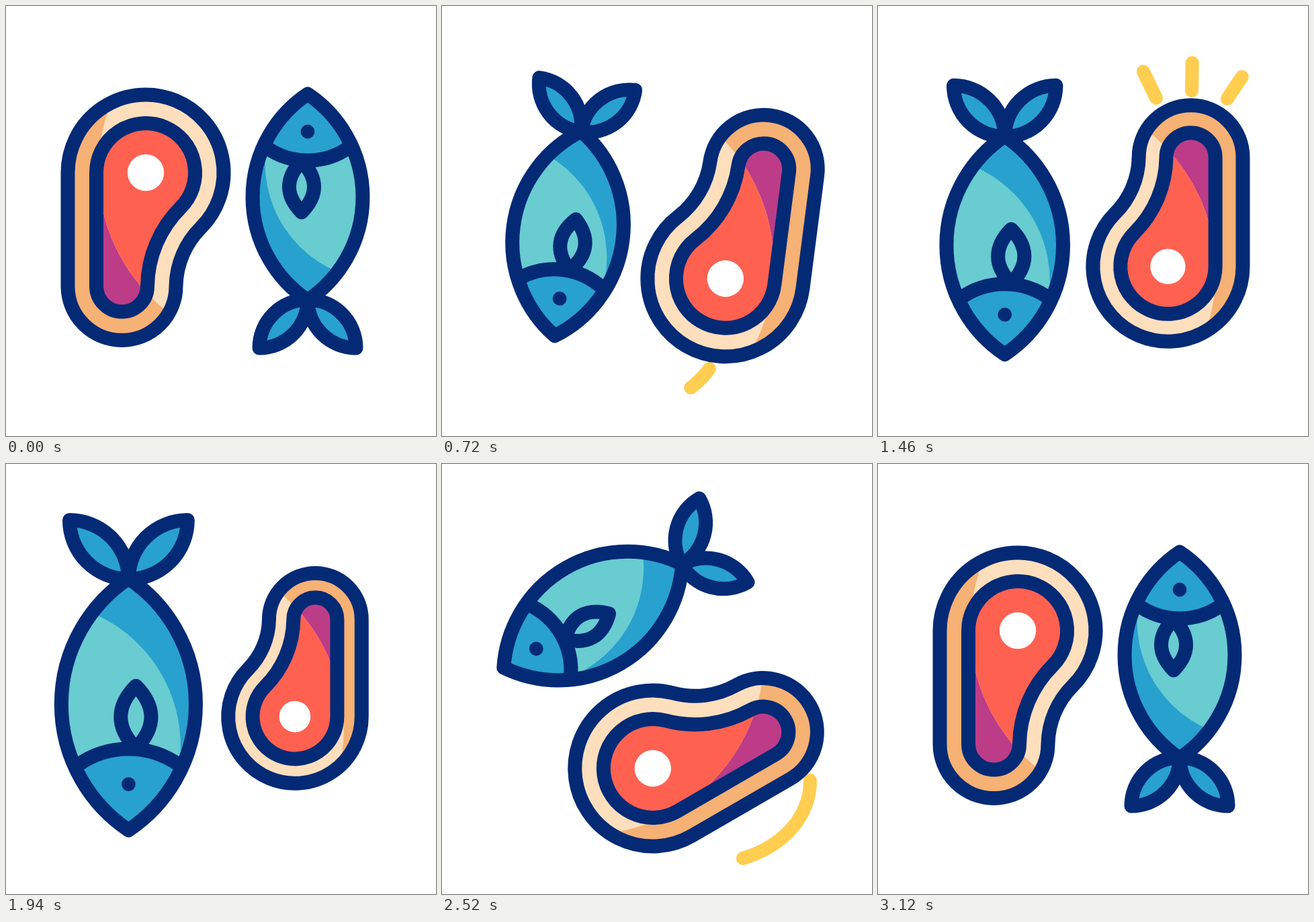
An HTML page with a canvas for the animation above (3.24 s loop, 640 px wide and 640 px high).

```html
<!DOCTYPE html>
<html lang="en">
<head>
<meta charset="utf-8">
<title>Steak and fish</title>
<style>
  html, body { margin: 0; width: 100%; height: 100%; overflow: hidden; background: #fff; }
  canvas { display: block; width: 100vmin; height: 100vmin; margin: 0 auto; }
</style>
</head>
<body>
<canvas id="stage" width="640" height="640"></canvas>
<script>
const ctx = document.getElementById('stage').getContext('2d');
const LOOP = 3240, LINE = 21;
const NAVY = '#042a76', YELLOW = '#ffcd50', BLUE = '#28a1ce', TEAL = '#68ccd1',
      FAT = '#fddfbd', FAT_DARK = '#f6b174', MEAT = '#ff6151', MEAT_DARK = '#bc3c87';

// Shapes in their resting pose
const rind = new Path2D('M92 248A116 116 0 1 1 290 330A126 126 0 0 0 253 417A80.5 80.5 0 0 1 92 417Z');
const meat = new Path2D('M134.5 248A73.5 73.5 0 1 1 260 300A168 168 0 0 0 210.5 417A38 38 0 0 1 134.5 417Z');
const body = new Path2D('M449 131A184.7 184.7 0 0 0 449 438A184.7 184.7 0 0 0 449 131Z');
const gill = new Path2D('M386 209.5A107 107 0 0 0 512 209.5');
const fin = new Path2D('M440 231C415.3 256 415.3 282 440 307C464.7 282 464.7 256 440 231Z');
const tails = [
  new Path2D('M449 437A72 72 0 0 0 377 509A72 72 0 0 0 449 437Z'),
  new Path2D('M449 437A72 72 0 0 1 521 509A72 72 0 0 1 449 437Z')
];
const disc = (x, y, r) => {
  const p = new Path2D();
  p.arc(x, y, r, 0, Math.PI * 2);
  return p;
};
const steakLight = disc(405.3, 244.1, 268);
const fishLight = disc(561.2, 233.8, 175.6);
const head = disc(449, 123, 107);
const bone = disc(208, 248, 27.2);

// Timing helpers
const span = (t, a, b) => Math.min(1, Math.max(0, (t - a) / (b - a)));
const smooth = (t, a, b) => { const u = span(t, a, b); return u * u * (3 - 2 * u); };
const easeOut = (t, a, b) => 1 - (1 - span(t, a, b)) ** 2;

// Cubic ease with handles (x1, 0) and (x2, 1)
function bezierEase(u, x1, x2) {
  let lo = 0, hi = 1;
  for (let i = 0; i < 30; i++) {
    const s = (lo + hi) / 2, r = 1 - s;
    if (3 * r * r * s * x1 + 3 * r * s * s * x2 + s * s * s < u) lo = s; else hi = s;
  }
  return lo * lo * (3 - 2 * lo);
}

const turn = t => Math.PI * (bezierEase(span(t, 100, 936), 0.232, 0.2)
                           - bezierEase(span(t, 2260, 3110), 0.445, 0.2));

// 1 = fish large and steak small, 0 = both at normal size
const swell = t => smooth(t, 760, 1140) - smooth(t, 1140, 1620)
                 + smooth(t, 1620, 1985) - smooth(t, 1985, 2340);

function scaled(x, y, s, draw) {
  ctx.save();
  ctx.translate(x, y);
  ctx.scale(s, s);
  ctx.translate(-x, -y);
  ctx.strokeStyle = NAVY;
  ctx.lineWidth = LINE / s;
  draw();
  ctx.restore();
}

function fill(path, color) {
  ctx.fillStyle = color;
  ctx.fill(path);
}

function inside(clip, draw) {
  ctx.save();
  ctx.clip(clip);
  draw();
  ctx.restore();
}

// The light falls through a fixed circle while the steak changes size
function steak(s) {
  const layer = draw => scaled(222, 359, s, draw);
  const paint = (fat, flesh) => layer(() => {
    fill(rind, fat);
    fill(meat, flesh);
  });
  paint(FAT_DARK, MEAT_DARK);
  inside(steakLight, () => paint(FAT, MEAT));
  layer(() => {
    ctx.stroke(rind);
    ctx.stroke(meat);
    fill(bone, '#fff');
  });
}

function fish(s) {
  scaled(410, 294, s, () => {
    for (const leaf of tails) {
      fill(leaf, BLUE);
      ctx.stroke(leaf);
    }
    fill(body, BLUE);
    inside(fishLight, () => fill(body, TEAL));
    inside(body, () => fill(head, BLUE));
    fill(fin, TEAL);
    ctx.stroke(fin);
    ctx.stroke(gill);
    ctx.stroke(body);
    fill(disc(449, 187, 10.4 / s), NAVY);
  });
}

// Part of a cubic curve between parameters a and b
function trail(p, a, b) {
  if (b - a < 0.004) return;
  ctx.beginPath();
  for (let i = 0; i <= 40; i++) {
    const s = a + (b - a) * i / 40, r = 1 - s;
    const at = k => r * r * r * p[k] + 3 * r * r * s * p[k + 2] + 3 * r * s * s * p[k + 4] + s * s * s * p[k + 6];
    ctx.lineTo(at(0), at(1));
  }
  ctx.stroke();
}

function rays(lines, a, b) {
  if (b - a < 0.01) return;
  for (const [x, y, u, v] of lines) {
    ctx.beginPath();
    ctx.moveTo(x + (u - x) * a, y + (v - y) * a);
    ctx.lineTo(x + (u - x) * b, y + (v - y) * b);
    ctx.stroke();
  }
}

const sweepOut = [157, 521, 245, 603, 340, 617, 398, 540];
const sweepBack = [548, 471, 548, 555, 450, 620, 310, 588];
const steakRays = [[414, 137, 386, 79], [467, 126, 468, 65], [520, 138, 552, 90]];
const fishRays = [[124, 532, 96, 582], [183, 545, 183, 603], [242, 532, 270, 582]];

function render(t) {
  ctx.fillStyle = '#fff';
  ctx.fillRect(0, 0, 640, 640);
  ctx.lineJoin = 'round';

  ctx.strokeStyle = YELLOW;
  ctx.lineWidth = 20;
  ctx.lineCap = 'round';
  trail(sweepOut, smooth(t, 410, 820), smooth(t, 286, 506));
  trail(sweepBack, smooth(t, 2540, 2900), smooth(t, 2400, 2608));
  rays(fishRays, smooth(t, 1085, 1310), easeOut(t, 955, 1165));
  rays(steakRays, smooth(t, 1500, 1745), easeOut(t, 1370, 1580));
  ctx.lineCap = 'butt';

  const p = swell(t);
  ctx.save();
  ctx.translate(320, 320);
  ctx.rotate(-turn(t));
  ctx.translate(-320, -320);
  steak(1 - 0.15 * p);
  fish(1 + 0.23 * p);
  ctx.restore();
}

const start = performance.now();
function tick() {
  render((performance.now() - start) % LOOP);
  requestAnimationFrame(tick);
}
tick();
</script>
</body>
</html>
```
